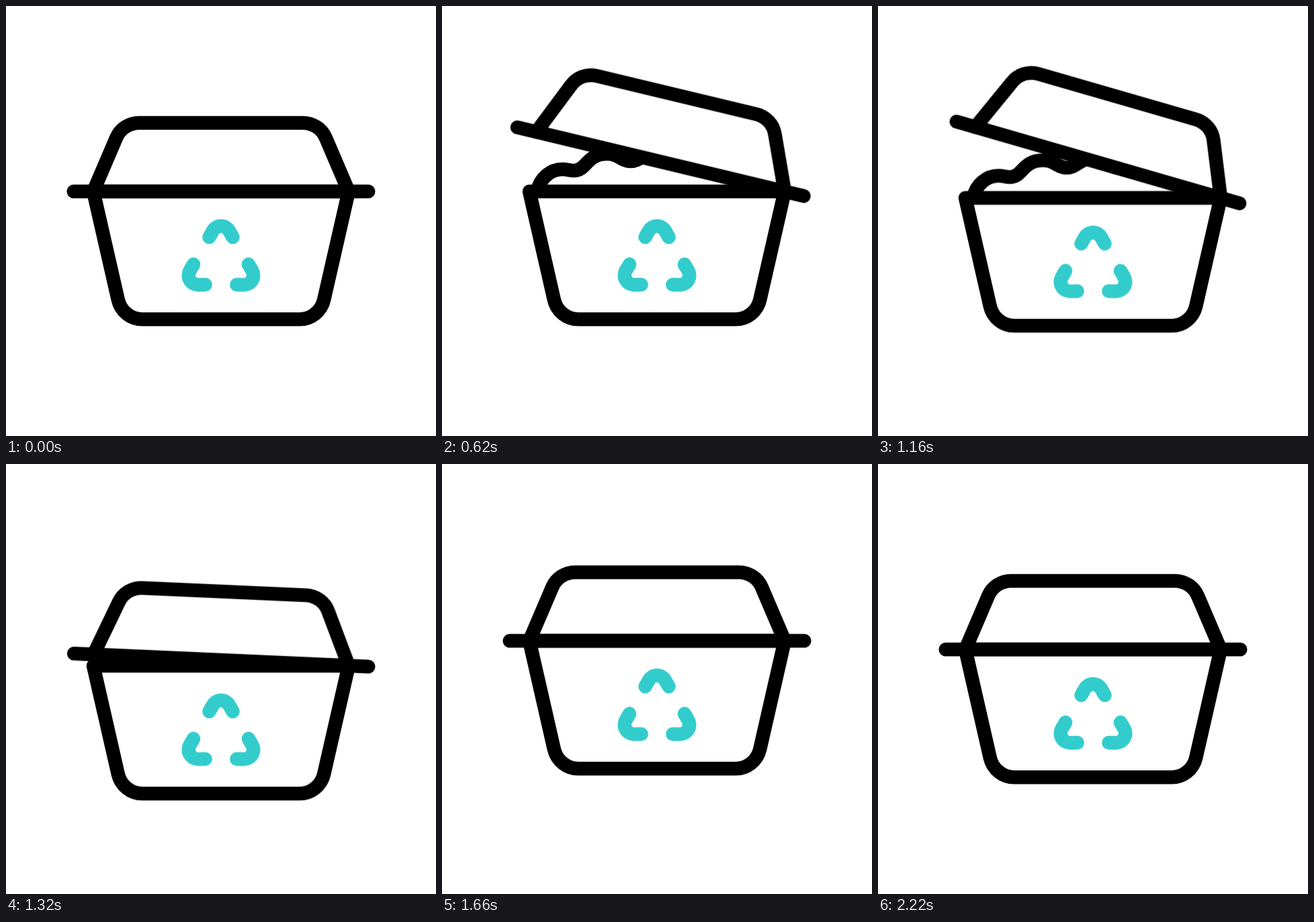
An HTML page without scripts that plays this animation: 640 by 640 pixels, repeating every 2400 ms.

```html
<!DOCTYPE html>
<html lang="en">
<head>
<meta charset="utf-8">
<title>Recyclable food box</title>
<style>
  html, body { margin: 0; width: 100%; height: 100%; overflow: hidden; background: #fff; }
  svg { display: block; width: 100%; height: 100%; }

  .line { fill: none; stroke: #000; stroke-width: 20.5; stroke-linecap: round; stroke-linejoin: round; }
  .arrow { stroke: #33cccc; }
  .cover { fill: #fff; }

  .box, .lid {
    animation: 2400ms cubic-bezier(.3333, 0, .6667, 1) infinite;
  }
  .box { animation-name: bounce; }
  .lid { animation-name: open; transform-origin: 510px 276px; }

  @keyframes bounce {
    0%, 41.6667% { transform: translateY(0); }
    58.3333% { transform: translateY(27px); }
    75% { transform: translateY(-28.2px); }
    91.6667%, 100% { transform: translateY(0); }
  }
  @keyframes open {
    0%, 8.3333% { transform: rotate(0deg); }
    41.6667% { transform: rotate(25deg); }
    58.3333%, 100% { transform: rotate(0deg); }
  }
</style>
</head>
<body>
<svg viewBox="0 0 640 640">
  <defs>
    <path id="food" d="M142 275C146 256 162 243 179 243C187 243 189 245 196 245C216 245 214 220 246 220C264 220 266 231 281 231C296 231 300 217 320 217"/>
    <path id="arrow" d="M302.5 344L307.9 334.5A14 14 0 0 1 332.1 334.5L337.5 344"/>
  </defs>
  <g class="box line">
    <use href="#food"/>
    <use href="#food" transform="matrix(-1 0 0 1 640 0)"/>
    <g class="lid">
      <path class="cover" d="M130 276L164 196.5A37 37 0 0 1 198 173.9H442A37 37 0 0 1 476 196.5L510 276"/>
      <path d="M100.7 276H539.3"/>
    </g>
    <path d="M130 276L166.8 437.3A37 37 0 0 0 203 466.2H437A37 37 0 0 0 473.2 437.3L510 276Z"/>
    <g class="arrow">
      <use href="#arrow"/>
      <use href="#arrow" transform="rotate(120 320 381.1)"/>
      <use href="#arrow" transform="rotate(240 320 381.1)"/>
    </g>
  </g>
</svg>
</body>
</html>
```
